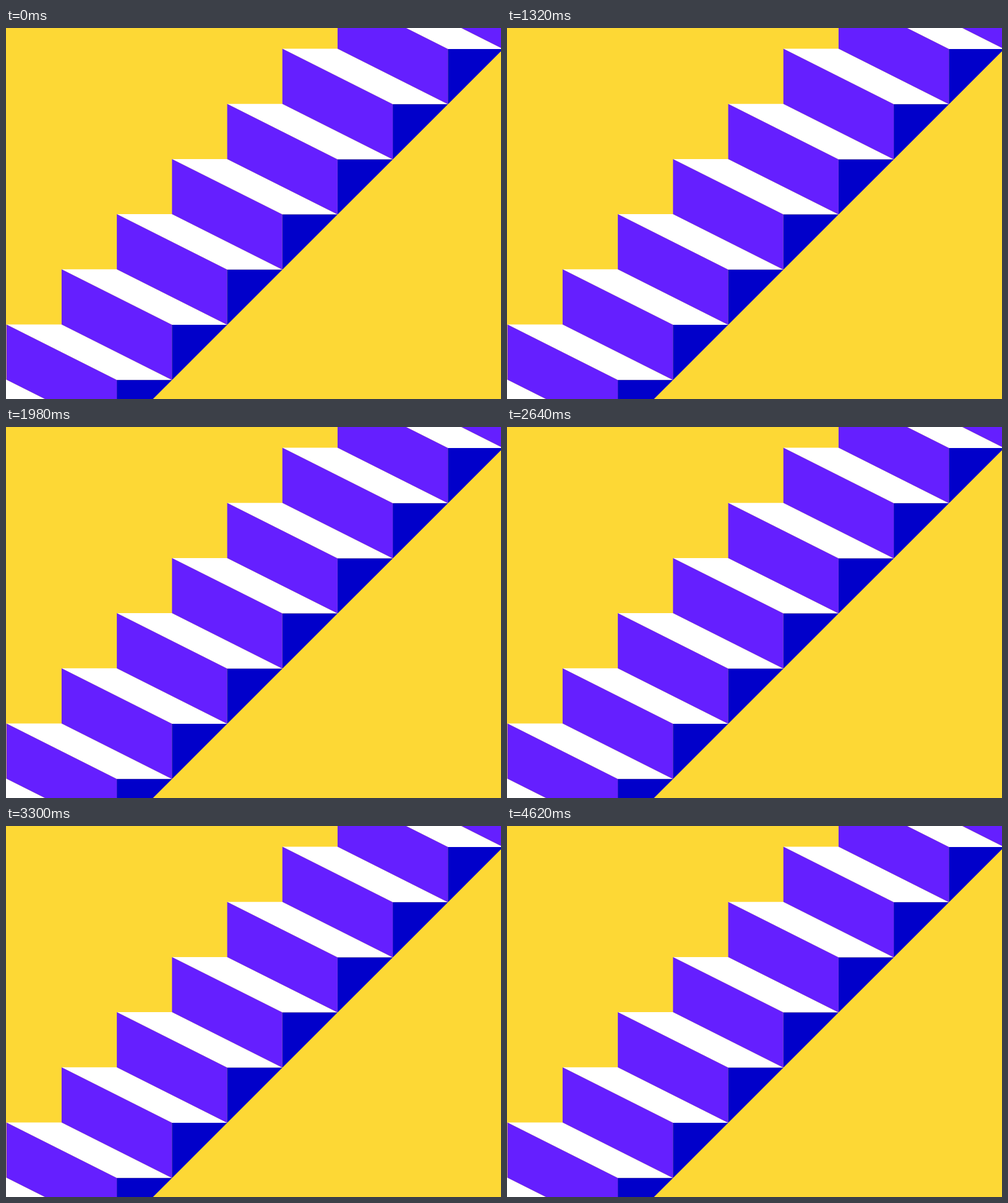
Write an HTML page with a canvas that moves like this. It is 800 by 600 pixels and loops after 4.95 s.

```html
<!DOCTYPE html>
<html lang="en">
<head>
<meta charset="utf-8">
<title>Stairs</title>
<style>
  html, body { margin: 0; width: 100%; height: 100%; overflow: hidden; background: #fdd835; }
  canvas { display: block; }
</style>
</head>
<body>
<canvas id="stage" width="800" height="600"></canvas>
<script>
const ctx = document.getElementById('stage').getContext('2d');
const LOOP = 4950, HOLD = 330;
const STEP = 89.2;   // width of a tread and height of a riser
const DROP = 89.7;   // fall of the slanted edges
const COLORS = { ground: '#fdd835', riser: '#651fff', tread: '#ffffff', side: '#0100ca' };
const POSES = [{ x: 0.7, y: 479.5 }, { x: -42.6, y: 523.5 }];

function polygon(color, ...points) {
  ctx.fillStyle = color;
  ctx.beginPath();
  points.forEach(([x, y]) => ctx.lineTo(x, y));
  ctx.closePath();
  ctx.fill();
}

function drawStep(x, y) {
  const right = x + 2 * STEP, front = y + DROP;
  polygon(COLORS.tread, [x, y], [x + STEP, y], [right + STEP, front], [right, front]);
  polygon(COLORS.riser, [x, y], [right, front], [right, front + STEP], [x, y + STEP]);
  polygon(COLORS.side, [right, front], [right + STEP, front], [right, front + STEP]);
}

function draw(time) {
  const { x, y } = POSES[Math.floor((time % LOOP) / HOLD) % 2];
  ctx.fillStyle = COLORS.ground;
  ctx.fillRect(0, 0, 800, 600);
  for (let i = -4; i <= 10; i++) drawStep(x + i * STEP, y - i * STEP);
}

let start;
function tick(now) {
  start ??= now;
  draw(now - start);
  requestAnimationFrame(tick);
}
draw(0);
requestAnimationFrame(tick);
</script>
</body>
</html>
```
